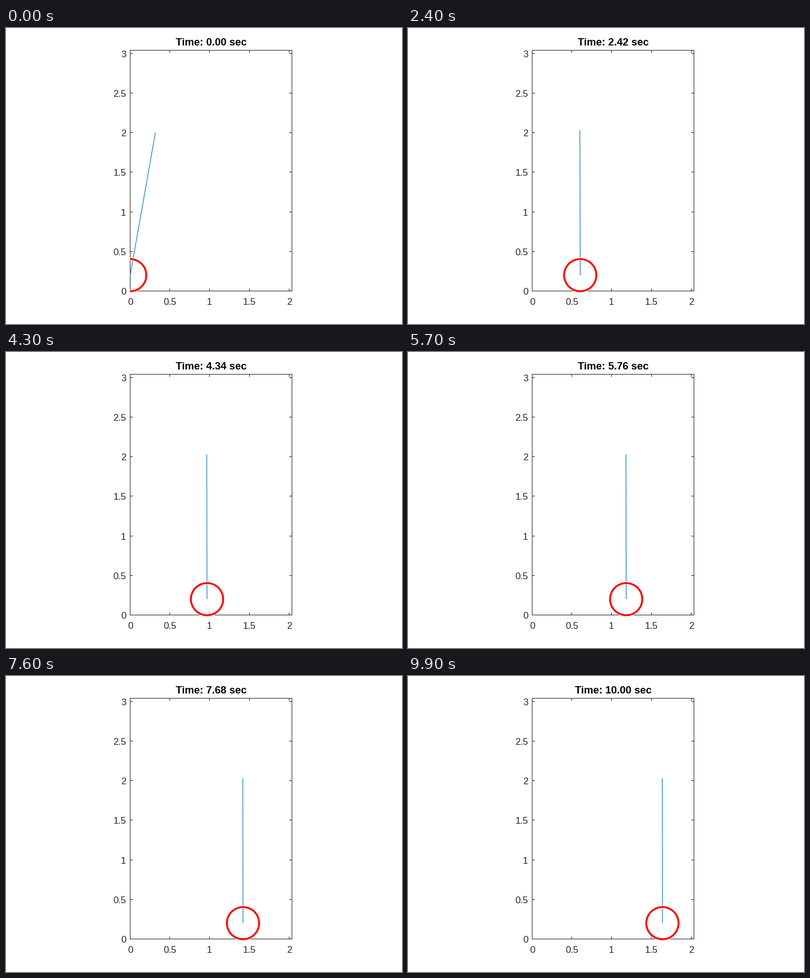
A matplotlib script that plays this animation: 700x525 px, repeating every 10 s.

```python
import numpy as np
import matplotlib.pyplot as plt
from matplotlib.animation import FuncAnimation
from matplotlib.patches import Circle, Rectangle

W, H, DPI = 700, 525, 100
FRAMES, DURATION = 100, 10.0
PX = 72 / DPI  # one pixel in points

# Plot box and scale in pixels
LEFT, RIGHT, TOP, BOTTOM = 219.5, 505.5, 39.5, 466.5
SCALE = 140.38
RADIUS, ROD = 0.2032, 1.8288
GREY, BLUE, RED = "#262626", "#0072bd", "#ff0000"

# Motion: slow drift of the wheel plus a quick righting of the rod
REACH, DRIFT, RIGHTING = 2.276, 0.1275, 4.8
TILT, LEAN = np.radians(10), 0.0035

plt.rcParams["font.family"] = "Liberation Sans"
fig = plt.figure(figsize=(W / DPI, H / DPI), dpi=DPI, facecolor="white")
ax = fig.add_axes([0, 0, 1, 1])
ax.set_xlim(0, W)
ax.set_ylim(H, 0)
ax.axis("off")


def to_px(x, y):
    return LEFT + SCALE * x, BOTTOM + 0.4 - SCALE * y


def stroke(xs, ys):
    # Coordinates already sit on pixel centres, so no snapping
    ax.plot(xs, ys, color=GREY, lw=PX, solid_capstyle="projecting",
            solid_joinstyle="miter", snap=False, zorder=1)


def label(x, y, value, ha):
    ax.text(x, y, f"{value:g}", size=16.67 * PX, color=GREY,
            ha=ha, va="baseline")


def draw_axes():
    stroke([LEFT, RIGHT, RIGHT, LEFT, LEFT], [BOTTOM, BOTTOM, TOP, TOP, BOTTOM])
    for value in np.arange(0, 2.1, 0.5):
        x = np.floor(LEFT + SCALE * value) + 0.5
        stroke([x, x], [BOTTOM, BOTTOM - 4])
        stroke([x, x], [TOP, TOP + 4])
        label(x, 491, value, "center")
    for value in np.arange(0, 3.1, 0.5):
        y = np.floor(BOTTOM - SCALE * value) + 0.5
        stroke([LEFT, LEFT + 4], [y, y])
        stroke([RIGHT, RIGHT - 4], [y, y])
        label(212.5, y + 6.5, value, "right")


def ring(color, width, zorder):
    patch = Circle((0, 0), RADIUS * SCALE, fill=False, ec=color,
                   lw=width * PX, zorder=zorder, snap=False)
    ax.add_patch(patch)
    patch.set_clip_path(Rectangle((LEFT - 0.5, 0), W, H,
                                  transform=ax.transData))
    return patch


def wheel_x(t):
    return (REACH * (1 - np.exp(-DRIFT * t))
            - REACH * DRIFT * t * np.exp(-RIGHTING * t))


def rod_angle(t):
    u = RIGHTING * t
    return (TILT + LEAN) * (1 + u) * np.exp(-u) - LEAN * np.exp(-DRIFT * t)


draw_axes()
rod, = ax.plot([], [], color=BLUE, lw=1.1 * PX, solid_capstyle="butt",
               snap=False, zorder=2)
halo = ring("white", 5.2, 3)
wheel = ring(RED, 3.3, 4)
title = ax.text(362.5, 31, "", size=18.33 * PX, weight="bold", color="black",
                ha="center", va="baseline")


def update(i):
    t = DURATION * i / (FRAMES - 1)
    x, angle = wheel_x(t), rod_angle(t)
    hub = to_px(x, RADIUS)
    tip = to_px(x + ROD * np.sin(angle), RADIUS + ROD * np.cos(angle))
    rod.set_data([hub[0], tip[0]], [hub[1], tip[1]])
    halo.center = wheel.center = hub
    title.set_text(f"Time: {t:.2f} sec")
    return rod, halo, wheel, title


anim = FuncAnimation(fig, update, frames=FRAMES, interval=100,
                     repeat=True, repeat_delay=0, blit=False)
plt.show()
```
